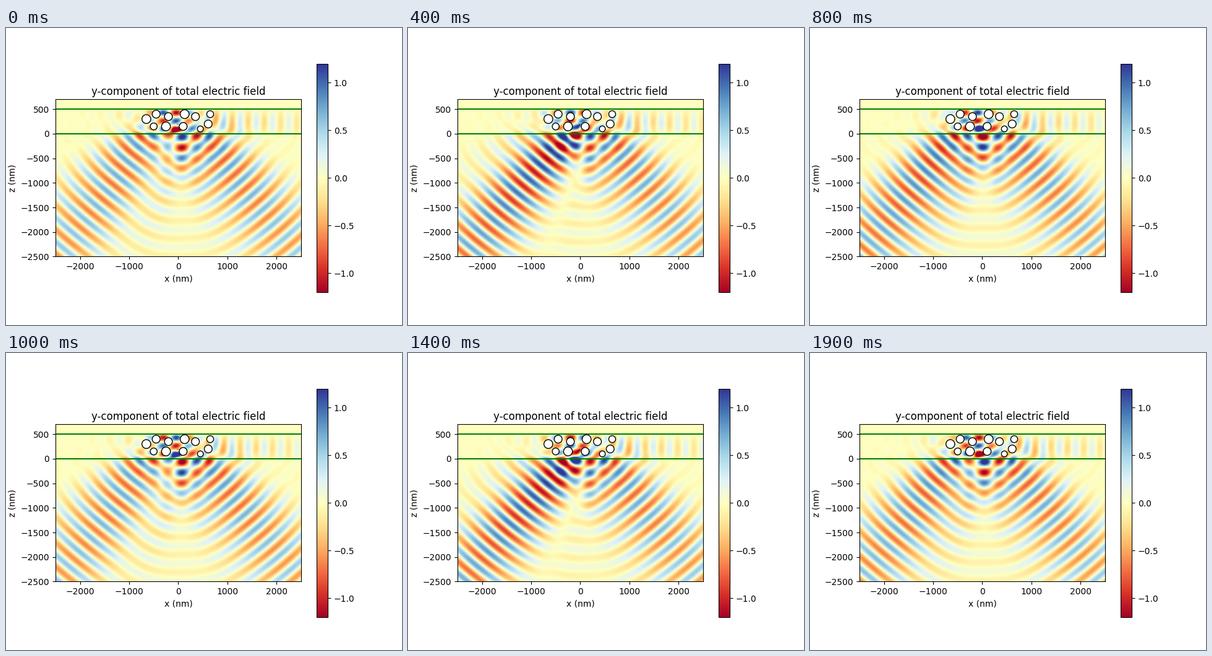
Animation, 640 px wide and 480 px high, one loop 2 s. Source, as a matplotlib script:

```python
import numpy as np
import matplotlib.pyplot as plt
from matplotlib.animation import FuncAnimation
from matplotlib.patches import Circle

FRAMES, INTERVAL = 20, 100
EXTENT = (-2500, 2500, -2500, 700)
FILM_TOP = 500

# x, z, radius in nm
SPHERES = [
    (-650, 300, 90), (-450, 400, 80), (-500, 150, 70), (-200, 350, 80),
    (-250, 150, 90), (130, 400, 90), (100, 150, 80), (350, 350, 80),
    (450, 100, 60), (610, 200, 80), (650, 400, 70),
]

K = 2 * np.pi * 1.52 / 550          # wavenumber below the film
TILT = np.radians(40)
KX, KZ = K * np.sin(TILT), K * np.cos(TILT)
K_GUIDE = 0.0190
MIRROR = 510                        # effective mirror plane
PHASE, SHIFT = -0.77, 0.47
WAIST, FOCUS_Z = 600, 450
RAYLEIGH = K * WAIST ** 2 / 2


def wave(phase):
    return np.exp(1j * phase)


def gauss(d, width):
    return np.exp(-(d / width) ** 2)


def envelope(s, d):
    """Gaussian beam without its carrier, s along and d across the axis."""
    spread = 1 + 1j * s / RAYLEIGH
    return np.exp(-(d / WAIST) ** 2 / spread) / spread


def beam(x, z):
    """Tilted Gaussian beam and its reflection, fading inside the film."""
    h = z - FOCUS_Z
    sin, cos = np.sin(TILT), np.cos(TILT)
    up = envelope(x * sin + h * cos, x * cos - h * sin)
    down = envelope(x * sin - h * cos, x * cos + h * sin)
    total = up * wave(KZ * z + SHIFT) + 0.8 * down * wave(-KZ * z - SHIFT)
    return total * wave(KX * x + PHASE) * np.exp(-np.clip(z, 0, None) / 160)


def scattered(x, z):
    """Outgoing wave from the particle cluster, strongest backwards."""
    drop = 200 - z
    r = np.hypot(x, drop) + 1e-6
    angle = np.arctan2(x, drop)
    lobe = 0.7 + 0.5 * gauss(angle + TILT, 0.4)
    lobe = lobe * np.clip(drop / r, 0, None) ** 0.7
    return 370 * lobe / (r + 300) * wave(K * r + 0.22)


def cluster(x, z):
    """Strong resonance between the particles."""
    profile = np.sin(0.0185 * (MIRROR - z)) * (z > 0)
    return 1.3 * gauss(x + 150, 480) * profile * wave(KX * x + 3.43)


def guided(x, z):
    """Film modes running away to both sides."""
    first = np.sin(np.pi * (520 - z) / 620)
    first = np.where(z < 0, np.sin(np.pi * 520 / 620) * np.exp(z / 120), first)
    second = np.sin(2 * np.pi * (MIRROR - z) / MIRROR) * (z > 0)

    def side(s, start, decay):
        rise = 1 / (1 + np.exp(-(s - start) / 70))
        return rise * np.exp(-np.clip(s - start, 0, None) / decay)

    left = side(-x, 650, 650)
    out = 0.5 * side(x, 560, 1800) * first * wave(K_GUIDE * (x - 926))
    out = out + 0.35 * side(x, 560, 300) * second * wave(0.0165 * (x - 990))
    out = out + 0.09 * left * first * wave(-K_GUIDE * (x + 1026))
    return out + 0.22 * left * second * wave(-0.0165 * (x + 1026))


x, z = np.meshgrid(np.arange(-2493.75, 2500, 12.5),
                   np.arange(-2493.75, 700, 12.5))
field = beam(x, z) + scattered(x, z) + cluster(x, z) + guided(x, z)
field = np.where(z > FILM_TOP, 0, field)


def snapshot(n):
    return (field * wave(-2 * np.pi * n / FRAMES)).real


fig, ax = plt.subplots(figsize=(6.4, 4.8), dpi=100)
image = ax.imshow(snapshot(0), extent=EXTENT, origin='lower', cmap='RdYlBu',
                  vmin=-1.2, vmax=1.2, interpolation='bicubic')
fig.colorbar(image)
for level in (0, FILM_TOP):
    ax.plot(EXTENT[:2], (level, level), color='green')
for cx, cz, radius in SPHERES:
    ax.add_patch(Circle((cx, cz), radius, facecolor='white',
                        edgecolor='black', zorder=3))
ax.set_xlim(EXTENT[:2])
ax.set_ylim(EXTENT[2:])
ax.set_xlabel('x (nm)')
ax.set_ylabel('z (nm)')
ax.set_title('y-component of total electric field', pad=5.3)


def update(n):
    image.set_data(snapshot(n))
    return image,


anim = FuncAnimation(fig, update, frames=FRAMES, interval=INTERVAL,
                     repeat=True, repeat_delay=0)
plt.show()
```
